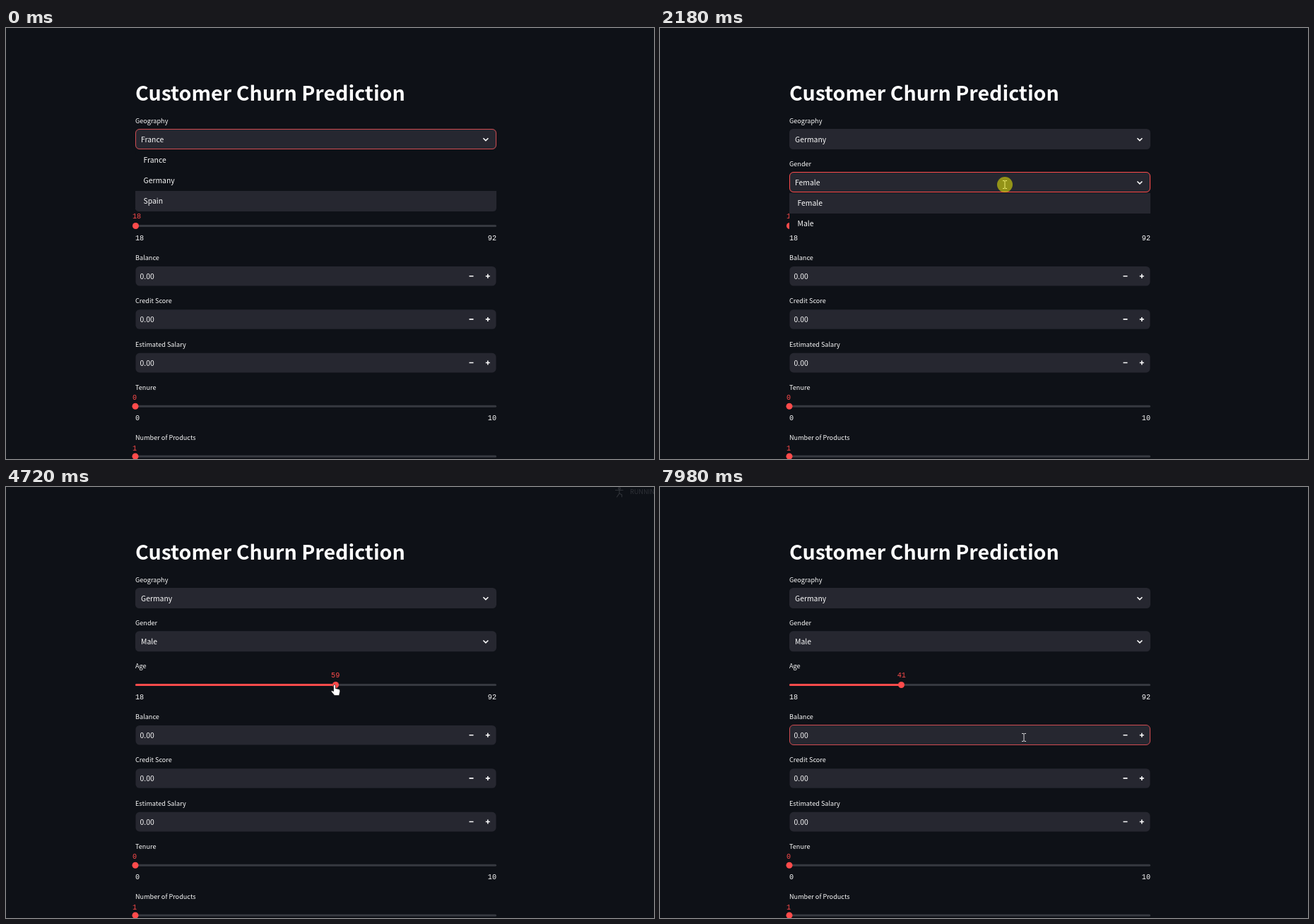
Recreate the animation shown at these times as an HTML page. Size 917 by 611 pixels, loop 8000 ms.

```html
<!DOCTYPE html>
<html lang="en">
<head>
<meta charset="utf-8">
<title>Customer Churn Prediction</title>
<style>
@property --age { syntax: "<integer>"; inherits: true; initial-value: 18; }
html, body { margin: 0; width: 100%; height: 100%; overflow: hidden; background: #0e1117; }
.stage { position: absolute; left: 0; top: 0; width: 917px; height: 611px; overflow: hidden; }
svg { position: absolute; left: 0; top: 0; }
text { font: 10.4px "Noto Sans CJK SC", "Noto Sans CJK JP", "Noto Sans", sans-serif; fill: #fafafa; }
.h1 { font-size: 28.6px; font-weight: 700; fill: #fff; }
.label text { font-size: 9.15px; }
.mono text, .value { font: 10.2px "Liberation Mono", "DejaVu Sans Mono", monospace; }
.end { text-anchor: end; }
.mono .red { fill: #ff4b4b; }
.box { fill: #262730; }
.bg { fill: #0e1117; }
.track { fill: #363940; }
.thumb { fill: #ff4b4b; }
.line { fill: none; stroke: #fafafa; stroke-width: 1.6; }
.ring { fill: none; stroke: #ff4b4b; }
.dull { stroke: #d04c51; }
.caret { fill: #fafafa; }

/* age slider */
.age { position: absolute; left: 183px; top: 279px; width: 511px; height: 3px;
  --x: calc((var(--age) - 18) * 511px / 74); animation: age 8s linear infinite; }
.age div { position: absolute; }
.fill { height: 3px; width: var(--x); background: #ff4b4b; border-radius: 2px; }
.knob { width: 9px; height: 9px; left: calc(var(--x) - 4.5px); top: -3px; border-radius: 50%; background: #ff4b4b; }
.value { left: max(-4px, calc(var(--x) - 6.1px)); top: -17px; line-height: 12px; color: #ff4b4b; counter-reset: n var(--age); }
.value::after { content: counter(n); }
@keyframes age {
  0%, 49% { --age: 18; }
  50.6% { --age: 20; }
  54%, 80% { --age: 59; }
  80.4%, 100% { --age: 41; }
}

/* switches */
.t { animation: 8s step-end infinite; }
.geo1 { animation-name: geo1; }
.geo2 { animation-name: geo2; }
.sex1 { animation-name: sex1; }
.sex2 { animation-name: sex2; }
.geoRing { animation-name: geoRing; }
.sexRing { animation-name: sexRing; }
.balRing { animation-name: balRing; }
.geoCaret { animation-name: geoCaret; }
.balCaret { animation-name: balCaret; }
.sexList { animation-name: sexList; }
.spain { animation-name: spain; }
.germany { animation-name: germany; }
.female { animation-name: female; }
.male { animation-name: male; }
@keyframes geo1 { 0% { opacity: 1 } 17.5%, 100% { opacity: 0 } }
@keyframes geo2 { 0% { opacity: 0 } 17.5%, 100% { opacity: 1 } }
@keyframes sex1 { 0% { opacity: 1 } 38%, 100% { opacity: 0 } }
@keyframes sex2 { 0% { opacity: 0 } 38%, 100% { opacity: 1 } }
@keyframes geoRing { 0% { opacity: 1 } 27%, 100% { opacity: 0 } }
@keyframes sexRing { 0%, 49%, 100% { opacity: 0 } 27% { opacity: 1 } }
@keyframes balRing { 0% { opacity: 0 } 86.8%, 100% { opacity: 1 } }
@keyframes geoCaret { 0%, 24.6%, 100% { opacity: 0 } 17.5% { opacity: 1 } }
@keyframes balCaret { 0%, 93.2%, 100% { opacity: 0 } 86.8% { opacity: 1 } }
@keyframes sexList { 0%, 38%, 100% { opacity: 0 } 27.2% { opacity: 1 } }
@keyframes spain { 0% { opacity: 1 } 11.2%, 100% { opacity: 0 } }
@keyframes germany { 0% { opacity: 0 } 11.2%, 100% { opacity: 1 } }
@keyframes female { 0% { opacity: 1 } 33%, 100% { opacity: 0 } }
@keyframes male { 0% { opacity: 0 } 33%, 100% { opacity: 1 } }

/* status in the corner */
.status { fill: none; stroke: #686a70; stroke-width: 1.2; stroke-linecap: round; }
.status text { font-size: 9.15px; stroke: none; fill: #686a70; }
.run { animation: run 8s linear infinite; }
.bike { animation: bike 8s linear infinite; }
@keyframes run {
  0%, 19.5%, 26.5%, 39%, 45%, 58%, 66%, 100% { opacity: 0 }
  21.5% { opacity: .22 }
  23%, 25%, 41%, 43.5%, 60%, 64.5% { opacity: .75 }
}
@keyframes bike { 0%, 82%, 90%, 100% { opacity: 0 } 86%, 88.9% { opacity: .75 } }

/* pointer */
.pointer { animation: move 8s linear infinite; }
.pointer path { fill: #fff; stroke: #111; stroke-width: .7; stroke-linejoin: round; }
.arrow { animation-name: arrow; }
.hand { animation-name: hand; }
.grab { animation-name: grab; }
.beam { animation-name: beam; }
.pointer .beam { fill: none; stroke: #d8d8da; stroke-width: 1; }
.press { fill: #ff0; fill-opacity: .5; animation-name: press; }
@keyframes move {
  0%, 4% { transform: translate(828px, 582px) }
  7% { transform: translate(700px, 430px) }
  10% { transform: translate(590px, 260px) }
  12% { transform: translate(520px, 207px) }
  13.9%, 15.5% { transform: translate(500px, 215px) }
  17% { transform: translate(499px, 217px) }
  21.5% { transform: translate(493px, 222px) }
  24.75%, 28% { transform: translate(488px, 222px) }
  32% { transform: translate(450px, 255px) }
  35.5% { transform: translate(395px, 279px) }
  36.4%, 38.2% { transform: translate(392px, 279px) }
  42% { transform: translate(270px, 284px) }
  45.6%, 49% { transform: translate(184px, 281px) }
  50.6% { transform: translate(195px, 280px) }
  54%, 67.5% { transform: translate(465px, 280px) }
  73.25% { transform: translate(435px, 278px) }
  77.4%, 78.25% { transform: translate(380px, 328px) }
  80%, 81.5% { transform: translate(342px, 280px) }
  86.5%, 93.1% { transform: translate(399px, 351px) }
  95% { transform: translate(570px, 366px) }
  96.6% { transform: translate(660px, 361px) }
  99.75%, 100% { transform: translate(515px, 355px) }
}
@keyframes arrow { 0%, 9.4%, 44%, 79%, 84.8%, 100% { opacity: 0 } 4%, 38%, 74.5%, 82% { opacity: 1 } }
@keyframes hand { 0%, 17.5%, 38%, 74.5%, 82%, 100% { opacity: 0 } 9.4%, 29%, 57.5%, 79% { opacity: 1 } }
@keyframes grab { 0%, 57.5%, 100% { opacity: 0 } 44% { opacity: 1 } }
@keyframes beam { 0%, 29% { opacity: 0 } 17.5%, 84.8%, 100% { opacity: 1 } }
@keyframes press {
  0%, 17.8%, 27.8%, 38.2%, 57.4%, 81.2%, 87.4%, 100% { opacity: 0 }
  16.4%, 26.4%, 37.1%, 49%, 79.9%, 86.3% { opacity: 1 }
}
</style>
</head>
<body>
<div class="stage">
<svg width="917" height="611" viewBox="0 0 917 611">
  <defs>
    <g id="select">
      <rect class="box" x="183" y="143" width="511" height="29" rx="5.5"/>
      <path class="line" d="M675.4 156.2l3.5 3.4 3.5-3.4"/>
    </g>
    <rect id="ring" x="183.5" y="143.5" width="510" height="28" rx="5.5"/>
    <g id="number">
      <rect class="box" x="183.5" y="338" width="510" height="27.6" rx="5.5"/>
      <text x="189.5" y="356">0.00</text>
      <path class="line" d="M655.5 351.7h6M678.8 351.7h6M681.8 348.7v6"/>
    </g>
    <g id="slider">
      <rect class="track" x="183" y="279" width="511" height="3" rx="1.5"/>
    </g>
    <circle id="thumb" class="thumb" cx="183" cy="280.5" r="4.5"/>
  </defs>

  <text class="h1" x="183" y="102.5">Customer Churn Prediction</text>
  <g class="label">
    <text x="183" y="135.3">Geography</text>
    <text x="183" y="196.3">Gender</text>
    <text x="183" y="257.4">Age</text>
    <text x="183" y="329.2">Balance</text>
    <text x="183" y="390.2">Credit Score</text>
    <text x="183" y="452">Estimated Salary</text>
    <text x="183" y="513">Tenure</text>
    <text x="183" y="584.2">Number of Products</text>
  </g>

  <use href="#select"/>
  <text class="t geo1" x="191" y="162">France</text>
  <text class="t geo2" x="191" y="162">Germany</text>
  <use href="#ring" class="ring dull t geoRing"/>
  <rect class="caret t geoCaret" x="237" y="151" width="1" height="14"/>

  <use href="#select" y="61.3"/>
  <text class="t sex1" x="191" y="223">Female</text>
  <text class="t sex2" x="191" y="223">Male</text>
  <use href="#ring" y="61" class="ring t sexRing"/>

  <use href="#number"/>
  <use href="#number" y="61.2"/>
  <use href="#number" y="122.8"/>
  <use href="#ring" y="194" class="ring dull t balRing"/>
  <rect class="caret t balCaret" x="209" y="345.5" width="1" height="13"/>

  <use href="#slider"/>
  <use href="#slider" y="255.7"/><use href="#thumb" y="255.7"/>
  <use href="#slider" y="326.7"/><use href="#thumb" y="326.7"/>
  <g class="mono">
    <text x="183" y="300.6">18</text>
    <text class="end" x="694" y="300.6">92</text>
    <text class="red" x="179" y="527.3">0</text>
    <text x="183" y="555.8">0</text>
    <text class="end" x="694" y="555.8">10</text>
    <text class="red" x="179" y="598.8">1</text>
  </g>

  <g class="status run">
    <text x="883" y="9.5">RUNNING</text>
    <circle cx="868" cy="2" r="1.4"/>
    <path d="M862.5 4.5h10.5M868 5v4l-3.5 5M868 9l3.5 2v3"/>
  </g>
  <g class="status bike">
    <text x="883" y="9.5">RUNNING</text>
    <circle cx="862" cy="9.6" r="3.7"/><circle cx="873" cy="9.6" r="3.7"/>
    <circle cx="869.5" cy=".9" r="1.3"/>
    <path d="M867.5 11V8.2l-2.6-2 3.4-2.9 2 2.2h2.5"/>
  </g>
</svg>

<div class="age"><div class="fill"></div><div class="knob"></div><div class="value"></div></div>

<svg width="917" height="611" viewBox="0 0 917 611">
  <defs><path id="row" class="box" d="M183 231h511v24q0 5-5 5h-501q-5 0-5-5z"/></defs>
  <g class="t geo1">
    <rect class="bg" x="183" y="173" width="511" height="87" rx="5"/>
    <use href="#row" class="t spain"/>
    <rect class="box t germany" x="183" y="202" width="511" height="29"/>
    <text x="194.5" y="191.2">France</text>
    <text x="194.5" y="220.2">Germany</text>
    <text x="194.5" y="249.2">Spain</text>
  </g>
  <g class="t sexList">
    <rect class="bg" x="183" y="234" width="511" height="58" rx="5"/>
    <rect class="box t female" x="183" y="234" width="511" height="29"/>
    <use href="#row" y="32" class="t male"/>
    <text x="194.5" y="252.2">Female</text>
    <text x="194.5" y="281.2">Male</text>
  </g>

  <g class="pointer">
    <path class="t arrow" d="M0 0v14l3.2-3 2.2 5 2.2-1-2.2-4.8h4.4z"/>
    <path class="t hand" d="M-1.4 1q1.3-2.2 2.7 0v4.6l4.6 1q2 .5 1.8 2.8l-1.2 6.2h-6.6l-4.9-5.8q.4-2 3.6-.2z"/>
    <path class="t grab" d="M-4.5-2.5q1-1.6 1.8 0l.4 1.2v-2.6q1-1.6 2 0 1-1.6 2 0 1-1 1.8.6 1.4-.6 1.5 1v3l-1.4 4.6h-6l-3-4.2q.2-1.6 1.7-.6z"/>
    <path class="t beam" d="M-3-5.5h2.2l.8.8.8-.8h2.2M0-5v10M-3 5.5h2.2l.8-.8.8.8h2.2"/>
    <circle class="t press" r="11"/>
  </g>
</svg>
</div>
</body>
</html>
```
